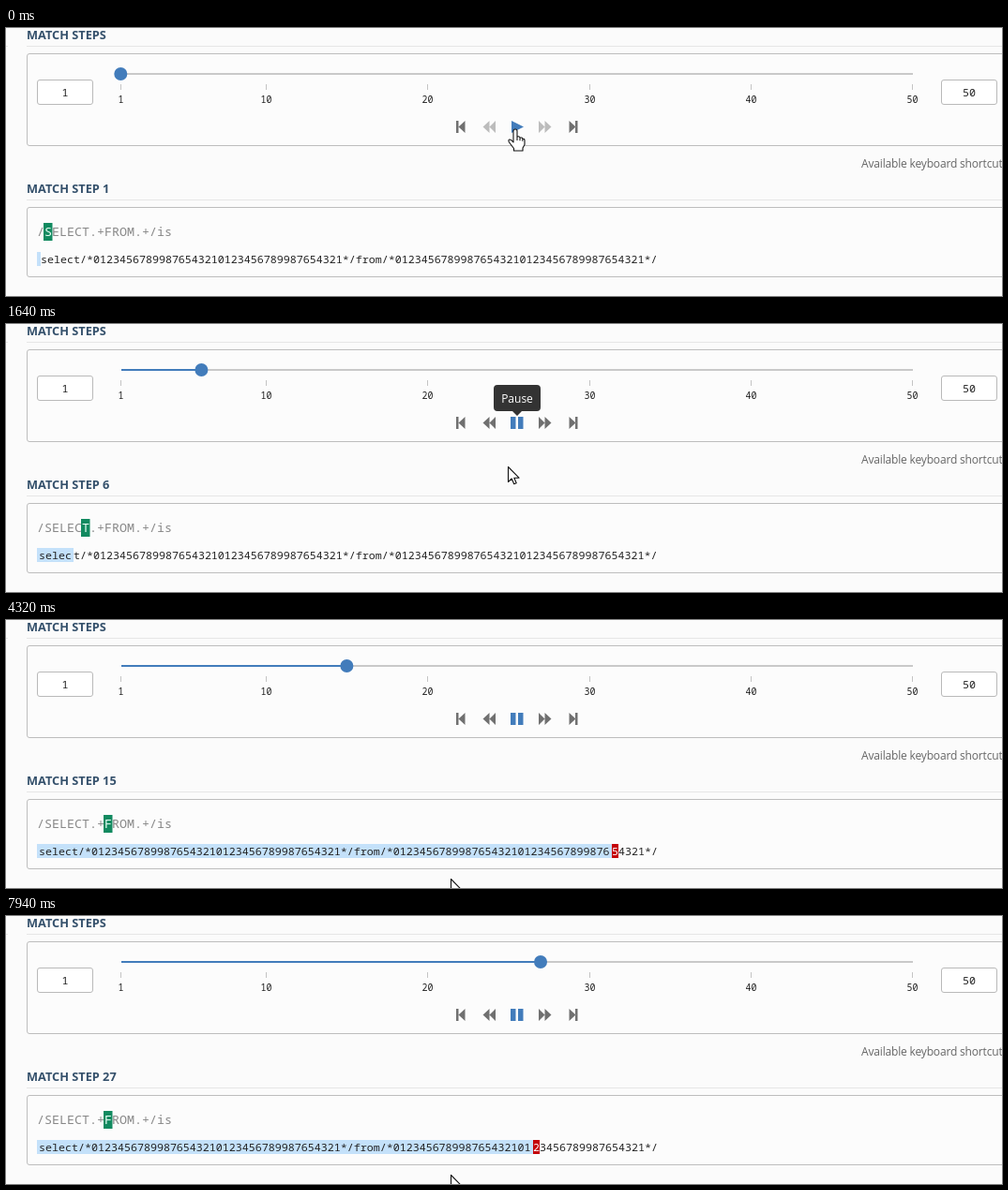
An HTML page that plays this animation: 1062 by 286 pixels, repeating every 8 s.

```html
<!DOCTYPE html>
<html lang="en">
<head>
<meta charset="utf-8">
<title>Match steps</title>
<style>
  html, body { margin: 0; width: 100%; height: 100%; overflow: hidden; background: #fbfbfb; }
  svg { display: block; }
  text { font: 12px "Open Sans", sans-serif; }
  .mono { font: 11.667px "Noto Sans Mono", monospace; fill: #222; }
  .head { font-weight: 700; font-size: 12.75px; fill: #34506b; }
  .panel { fill: #fcfcfc; stroke: #bdbdbd; }
  .field { fill: #fff; stroke: #b9b9b9; }
  .rule { stroke: #e6e6e6; }
  .dark { fill: #707070; }
  .blue { fill: #427cbb; }
  .mid { text-anchor: middle; }
  .cursor { fill: #fff; stroke: #111; stroke-width: 1.1; stroke-linejoin: round; }
</style>
</head>
<body>
<svg width="1062" height="286">
  <path class="rule" d="M0 19.5H2M22 19.5H1062M22 183.5H1062"/>
  <text class="head" x="22" y="12">MATCH STEPS</text>
  <text class="head" x="22" y="176" id="title"></text>
  <rect class="panel" x="22.5" y="27.5" width="1060" height="98" rx="2.5"/>
  <rect class="panel" x="22.5" y="191.5" width="1060" height="74" rx="2.5"/>
  <text x="912" y="149" fill="#666" letter-spacing="-.17">Available keyboard shortcuts</text>

  <rect class="field" x="33.5" y="55.5" width="59" height="26" rx="2.5"/>
  <rect class="field" x="997.5" y="55.5" width="59" height="26" rx="2.5"/>
  <text class="mono mid" x="63" y="73">1</text>
  <text class="mono mid" x="1027" y="73">50</text>

  <g id="scale"></g>
  <rect x="123" y="48" width="844" height="2" fill="#c9c9c9"/>
  <rect class="blue" x="123" y="48" height="2" id="bar"/>
  <circle class="blue" cy="49" r="7" id="knob"/>

  <path class="dark" d="M480 99h2.5v13h-2.5zM489.5 99v13l-7-6.5zM600.5 99v13l7-6.5zM607 99h2.5v13H607z"/>
  <path id="seek" d="M515.5 99v13l-7-6.5zM522 99v13l-6.5-6.5zM568 99v13l6.5-6.5zM574.5 99v13l7-6.5z"/>
  <path class="blue" id="toggle"/>

  <rect y="208" x="40" height="19" fill="#128a60" id="token"/>
  <text class="mono" x="33" y="222" style="font-size:13.333px;fill:#888" id="regex"></text>
  <rect x="33" y="239" height="15" fill="#c4e1fa" id="match"/>
  <rect y="239" width="7" height="15" fill="#c40008" id="miss"/>
  <text class="mono" y="251" id="subject"></text>

  <g id="tip">
    <path fill="#333" d="M524 65h42a4 4 0 0 1 4 4v20a4 4 0 0 1-4 4h-16l-5 5-5-5h-16a4 4 0 0 1-4-4v-20a4 4 0 0 1 4-4z"/>
    <text class="mid" x="545" y="84" fill="#fff">Pause</text>
  </g>
  <path class="cursor" id="hand" transform="translate(543 108)"
    d="M-2 2q0-2 2-2t2 2v6q3-.8 3 1.2q2.7-.8 2.8 1.1q2.200-.5 2.200 1.700v4.500l-2 3.500v3h-9.500v-2.500l-5-6.500q-1.200-2.500.3-3q1.700-.4 4.200 3zM2 8v4M5 9.200v3M7.800 10.300v2.500"/>
  <path class="cursor" id="arrow" d="M.5.5v16l3.700-3.500 2.500 5.800 2.500-1.100-2.400-5.500h5.200z"/>
</svg>
<script>
const LOOP = 8000;
const REGEX = "/SELECT.+FROM.+/is";
const DIGITS = "01234567899876543210123456789987654321";
const SUBJECT = `select/*${DIGITS}*/from/*${DIGITS}*/`;
// Start time of each match step
const STEPS = [0, 540, 790, 1100, 1370, 1640, 1910, 2340, 2590, 2870, 3120, 3390, 3660, 4050,
  4320, 4600, 4880, 5160, 5560, 5840, 6120, 6420, 6700, 6950, 7350, 7630, 7940];
// Arrow pointer: [time, x, y]; off stage when y is large
const POINTER = [[0, 0, 400], [1640, 535, 152], [1790, 522, 192], [1910, 0, 400],
  [3390, 476, 283], [3510, 475, 279], [3660, 474, 276]];

const $ = id => document.getElementById(id);
const set = (id, attrs) => { for (const k in attrs) $(id).setAttribute(k, attrs[k]); };
const knobX = step => 122.300 + (step - 1) * 17.220;
const span = (s, fill) => `<tspan fill="${fill}" style="fill:${fill}">${s}</tspan>`;

$("scale").innerHTML = [1, 10, 20, 30, 40, 50].map(n => {
  const x = Math.round(knobX(n));
  return `<rect x="${x}" y="60" width="1" height="6" fill="#c4c4c4"/>
    <text class="mono mid" x="${x + .5}" y="80" style="font-size:10px">${n}</text>`;
}).join("");

function showStep(step) {
  const x = knobX(step);
  $("title").textContent = "MATCH STEP " + step;
  set("knob", { cx: x });
  set("bar", { width: x - 123 > 0 ? x - 123 : 0 });

  const at = step < 8 ? step : 9, len = step === 7 ? 2 : 1;
  set("token", { x: 32 + 8 * at, width: 8 * len + 1.5 });
  $("regex").innerHTML = REGEX.slice(0, at) + span(REGEX.substr(at, len), "#e8fff5") + REGEX.slice(at + len);

  // Matching advances one character, then the greedy part backtracks from the end
  const count = step < 8 ? step - 1 : 102 - step;
  const end = 37 + 7 * count, failed = step > 8;
  set("match", { width: end - 33 });
  set("miss", { x: end, visibility: failed ? "visible" : "hidden" });
  const rest = SUBJECT.slice(count);
  $("subject").innerHTML = `<tspan x="35">${SUBJECT.slice(0, count)}</tspan><tspan x="${end}">` +
    (failed ? span(rest[0], "#fff") + rest.slice(1) : rest) + "</tspan>";
}

let shown = 0;
function draw(now) {
  const t = now % LOOP;
  const step = STEPS.filter(s => s <= t).length;
  if (step !== shown) showStep(shown = step);

  const playing = t >= 120;
  set("seek", { fill: playing ? "#707070" : "#bcbcbc" });
  set("toggle", { d: playing ? "M538 99h5.500v13h-5.500zM546 99h5.500v13h-5.500z" : "M539 99v13l13-6.500z" });
  set("tip", { opacity: t < 1370 || t >= 1910 ? 0 : t < 1790 ? 1 : .5 });
  set("hand", { visibility: t < 1640 ? "visible" : "hidden" });
  const [, x, y] = POINTER.filter(p => p[0] <= t).pop();
  set("arrow", { transform: `translate(${x} ${y})` });
  requestAnimationFrame(draw);
}
const start = performance.now();
draw(0);
function tick() { return performance.now() - start; }
draw = (f => () => f(tick()))(draw);
</script>
</body>
</html>
```
